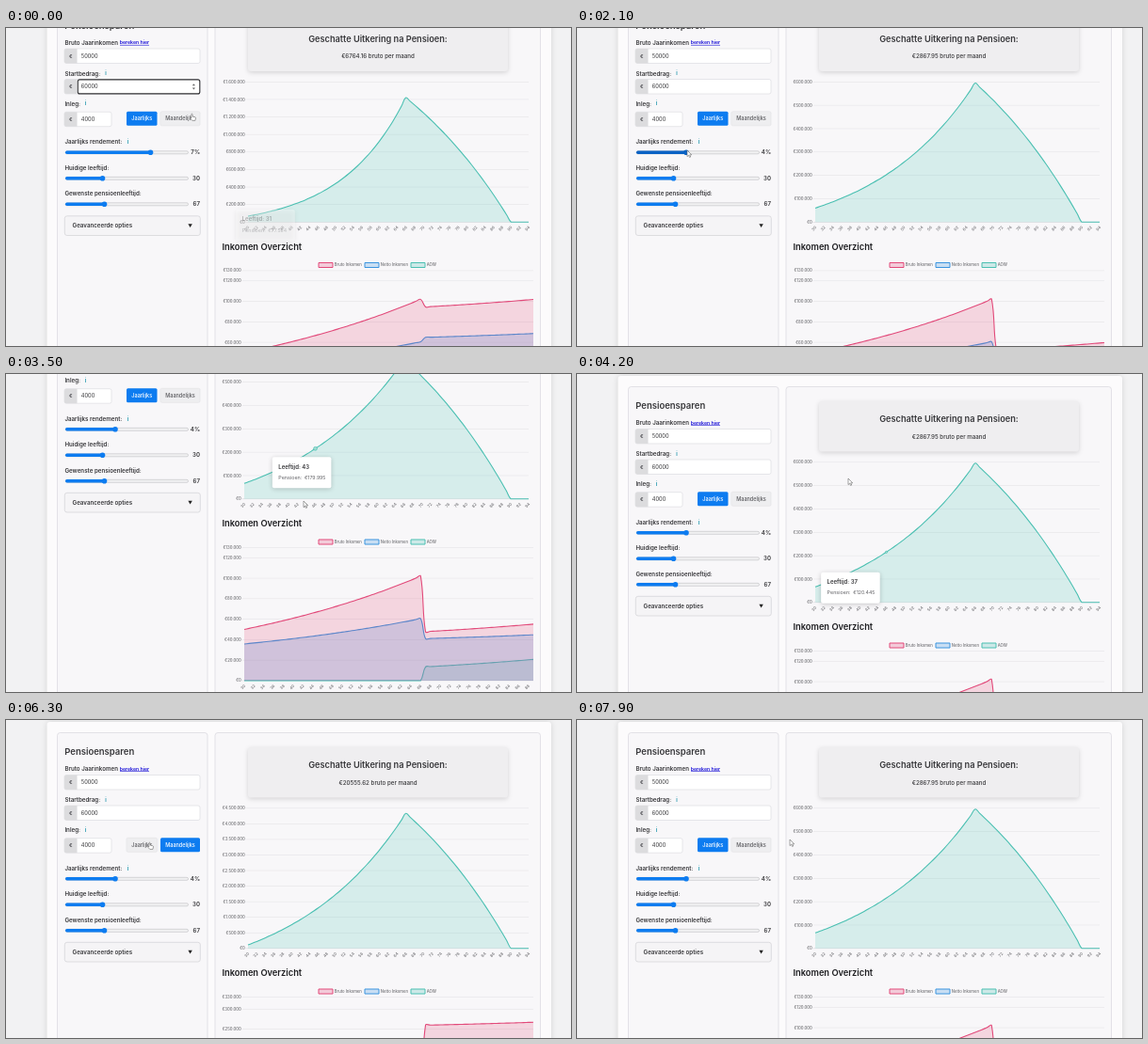
An HTML page with a canvas that plays this animation: 600 px wide and 338 px high, repeating every 8 s.

```html
<!DOCTYPE html>
<html lang="nl">
<head>
<meta charset="utf-8">
<title>Pensioensparen</title>
<style>
html, body { margin: 0; width: 100%; height: 100%; overflow: hidden; background: #f2f2f3; }
canvas { display: block; width: 600px; height: 338px; }
</style>
</head>
<body>
<canvas id="stage"></canvas>
<script>
const W = 600, H = 338, LOOP = 8000;
const canvas = document.getElementById('stage');
const ctx = canvas.getContext('2d');
const ratio = Math.max(1, window.devicePixelRatio || 1);
canvas.width = W * ratio;
canvas.height = H * ratio;

const FONT = 'Inter, "Open Sans", sans-serif';
const BLUE = '#0d7cf0', DARK = '#38383b', GREY = '#707074';
const GREEN = [75, 192, 178], PINK = [226, 74, 122], SKY = [58, 148, 222];
const rgba = (c, a) => `rgba(${c},${a})`;
const lerp = (a, b, p) => a + (b - a) * p;
const clamp = (v, a, b) => Math.min(b, Math.max(a, v));
const smooth = p => p * p * (3 - 2 * p);
const easeOut = p => 1 - Math.pow(1 - clamp(p, 0, 1), 4);
const euro = v => '€' + String(Math.round(v)).replace(/\B(?=(\d{3})+$)/g, '.');

// Each state starts at a time; the charts glide to it in one second
const states = [
  { at: -5000, rate: 7, pay: 6764.16, top: 1.6e6, step: 2e5, left: 257 },
  { at: 1080, rate: 5, pay: 3795.42, top: 8e5, step: 1e5, left: 253 },
  { at: 1900, rate: 4, pay: 2867.95, top: 6e5, step: 1e5, left: 253 },
  { at: 5200, rate: 4, pay: 20555.62, top: 4.5e6, step: 5e5, left: 257, monthly: true },
  { at: 6500, rate: 4, pay: 2867.95, top: 6e5, step: 1e5, left: 253 }
];
const A = { right: 555, top: 93.8, base: 242.8, n: 65 };
const B = { left: 253, right: 560, top: 294.4, base: 435.9, n: 60 };
const WORK = 36;

function capital(s, i) {
  const g = 1 + s.rate / 100, paid = s.monthly ? 48000 : 4000;
  const grown = k => 60000 * g ** k + paid * g * (g ** k - 1) / (g - 1);
  if (i <= WORK) return grown(i + 1);
  const left = Math.max(0, 1 - 1.03 ** (i - WORK - 24));
  return grown(WORK + 1) * left / (1 - 1.03 ** -24);
}

function income(s, i) {
  if (i <= WORK) {
    const gross = 50000 * 1.02 ** i;
    return [gross, 35800 + (gross - 50000) * .475, 0];
  }
  const aow = 13400 * 1.02 ** (i - WORK - 1);
  const gross = s.pay * 12 + aow;
  return [gross, 41000 + (gross - 47800) * .51, aow];
}

function settle(s) {
  const top2 = s.monthly ? 330000 : 130000;
  const lines = [[], [], [], []];
  for (let i = 0; i < A.n; i++) {
    lines[0].push({
      x: lerp(s.left, A.right, i / (A.n - 1)),
      y: lerp(A.base, A.top, capital(s, i) / s.top)
    });
  }
  for (let i = 0; i < B.n; i++) {
    income(s, i).forEach((v, k) => lines[k + 1].push({
      x: lerp(B.left, B.right, i / (B.n - 1)),
      y: lerp(B.base, B.top, v / top2)
    }));
  }
  return lines;
}
states.forEach(s => { s.lines = settle(s); });

function shape(t, k) {
  const s = states[k];
  const p = easeOut((t - s.at) / 1000);
  if (k === 0 || p === 1) return s.lines;
  const from = shape(s.at, k - 1);
  return s.lines.map((line, a) => line.map((q, i) => ({
    x: lerp(from[a][i].x, q.x, p), y: lerp(from[a][i].y, q.y, p)
  })));
}

// Eased path through [time, ...values] stops
function along(stops, t) {
  let i = 0;
  while (i < stops.length - 2 && t >= stops[i + 1][0]) i++;
  const a = stops[i], b = stops[i + 1];
  const p = smooth(clamp((t - a[0]) / (b[0] - a[0]), 0, 1));
  return a.slice(1).map((v, k) => lerp(v, b[k + 1], p));
}
const pointerStops = [
  [0, 197, 91], [100, 197, 91], [650, 154, 130], [900, 153, 130], [1080, 130, 130],
  [1750, 130, 130], [1900, 117, 130], [2100, 117, 130], [2850, 316, 135],
  [3600, 316, 135], [4200, 288, 111], [4400, 288, 111], [4950, 188, 130],
  [5600, 188, 130], [6150, 152, 130], [6750, 152, 130], [7600, 226, 127], [8000, 226, 127]
];
const scrollStops = [[0, 36.5], [3100, 36.5], [3400, 110], [3700, 110], [4100, 0], [8000, 0]];

function text(str, x, y, size, weight = 400, color = DARK, align = 'left') {
  ctx.font = `${weight} ${size}px ${FONT}`;
  ctx.fillStyle = color;
  ctx.textAlign = align;
  ctx.textBaseline = 'alphabetic';
  ctx.fillText(str, x, y + size * .35);
}

function box(x, y, w, h, r, fill, stroke, line = .7) {
  ctx.beginPath();
  ctx.roundRect(x, y, w, h, r);
  if (fill) { ctx.fillStyle = fill; ctx.fill(); }
  if (stroke) { ctx.strokeStyle = stroke; ctx.lineWidth = line; ctx.stroke(); }
}

function shadowBox(x, y, w, h, r, fill, blur, alpha, dy = 1) {
  ctx.save();
  ctx.shadowColor = `rgba(0,0,0,${alpha})`;
  ctx.shadowBlur = blur * ratio;
  ctx.shadowOffsetY = dy * ratio;
  box(x, y, w, h, r, fill);
  ctx.restore();
}

function rule(x1, x2, y, color = '#e4e3e6') {
  ctx.fillStyle = color;
  ctx.fillRect(x1, y - .3, x2 - x1, .6);
}

function label(str, y) {
  text(str, 62.4, y, 6.2, 600);
}

function info(x, y) {
  text('i', x, y, 5.5, 700, '#2a9bb0', 'center');
}

function field(y, w, value) {
  box(62, y, w, 15.5, 2, '#ffffff', '#dddde1');
  box(62, y, 13.5, 15.5, [2, 0, 0, 2], '#dcdcde');
  text('€', 68.7, y + 7.8, 5.2, 600, '#444448', 'center');
  text(value, 79.8, y + 7.8, 5.7);
}

function slider(y, thumb, value, color) {
  box(63.2, y - 1.5, 130.3, 3, 1.5, '#f1f1f2', '#bdbdc0', .6);
  box(63, y - 1.7, thumb - 63, 3.4, 1.7, color);
  ctx.beginPath();
  ctx.arc(thumb, y, 2.8, 0, 7);
  ctx.fillStyle = color;
  ctx.fill();
  text(value, 206, y, 6.1, 600, DARK, 'right');
}

function form(t, s) {
  text('Pensioensparen', 62.2, 34, 9.5, 600);
  label('Bruto Jaarinkomen', 52);
  text('bereken hier', 120.8, 52, 5.2, 600, '#1a12d8');
  rule(121, 152, 54.7, '#1a12d8');
  field(58.5, 144, '50000');
  label('Startbedrag:', 85);
  info(106, 85);
  field(91, 144, '60000');
  if (t < 850) {
    box(76.3, 91.4, 129.5, 15, 2, null, '#333336', 1.1);
    ctx.fillStyle = '#666';
    ctx.beginPath();
    ctx.moveTo(197.8, 97.7); ctx.lineTo(199.4, 95.7); ctx.lineTo(201, 97.7);
    ctx.moveTo(197.8, 99.9); ctx.lineTo(199.4, 101.9); ctx.lineTo(201, 99.9);
    ctx.fill();
  }
  label('Inleg:', 117);
  info(84.5, 117);
  field(125.7, 50, '4000');
  [['Jaarlijks', 128, 32.5, !s.monthly], ['Maandelijks', 164, 42, s.monthly]].forEach(([name, x, w, on]) => {
    box(x, 125.3, w, 15, 1.5, on ? BLUE : '#eeeef0', on ? null : '#e4e4e7');
    text(name, x + w / 2, 132.8, 5.5, 500, on ? '#fff' : '#5a5a5e', 'center');
  });
  label('Jaarlijks rendement:', 157.7);
  info(129.5, 157.7);
  slider(168.8, 66 + s.rate * 12.5, s.rate + '%', t > 600 && t < 2200 ? '#0a62c4' : BLUE);
  label('Huidige leeftijd:', 185);
  slider(196.3, 102.5, '30', BLUE);
  label('Gewenste pensioenleeftijd:', 212.5);
  slider(223.8, 104.5, '67', BLUE);
  box(62.3, 236.3, 144, 20.7, 2.5, '#f5f4f6', '#d2d1d6');
  text('Geavanceerde opties', 70.5, 246.6, 6.2, 600);
  ctx.fillStyle = '#222';
  ctx.beginPath();
  ctx.moveTo(193.4, 244.7); ctx.lineTo(197.8, 244.7); ctx.lineTo(195.6, 248.6);
  ctx.fill();
}

// Smoothed line with the usual 0.4 tension
function curve(pts, base, color, alpha) {
  const n = pts.length, tension = .4;
  const ctl = pts.map((q, i) => {
    const a = pts[Math.max(0, i - 1)], b = pts[Math.min(n - 1, i + 1)];
    const d1 = Math.hypot(q.x - a.x, q.y - a.y), d2 = Math.hypot(b.x - q.x, b.y - q.y);
    const f1 = tension * d1 / (d1 + d2 || 1), f2 = tension * d2 / (d1 + d2 || 1);
    const dx = b.x - a.x, dy = b.y - a.y;
    return [q.x - f1 * dx, Math.min(base, q.y - f1 * dy), q.x + f2 * dx, Math.min(base, q.y + f2 * dy)];
  });
  const path = new Path2D();
  path.moveTo(pts[0].x, pts[0].y);
  for (let i = 1; i < n; i++) {
    path.bezierCurveTo(ctl[i - 1][2], ctl[i - 1][3], ctl[i][0], ctl[i][1], pts[i].x, pts[i].y);
  }
  const area = new Path2D(path);
  area.lineTo(pts[n - 1].x, base);
  area.lineTo(pts[0].x, base);
  ctx.fillStyle = rgba(color, alpha);
  ctx.fill(area);
  ctx.strokeStyle = rgba(color, 1);
  ctx.lineWidth = 1.1;
  ctx.lineJoin = 'round';
  ctx.stroke(path);
}

function axes(chart, left, ticks, top) {
  ticks.forEach(v => {
    const y = lerp(chart.base, chart.top, v / top);
    rule(left - 2.5, chart.right, y, v ? '#e5e4e7' : '#d8d7db');
    text(euro(v), left - 3.2, y + .1, 4.25, 500, GREY, 'right');
  });
  for (let i = 0; i < chart.n; i += 2) {
    const x = lerp(left, chart.right, i / (chart.n - 1));
    ctx.save();
    ctx.translate(x + .5, chart.base + 4.8);
    ctx.rotate(-.82);
    text(String(30 + i), 0, 0, 4.2, 500, GREY, 'right');
    ctx.restore();
  }
}

function range(top, step) {
  const out = [];
  for (let v = 0; v < top; v += step) out.push(v);
  return out.concat(top);
}

function charts(t, s, lines) {
  shadowBox(257, 29, 276, 53.5, 3, '#efeef0', 5, .15, 1.5);
  text('Geschatte Uitkering na Pensioen:', 395, 48, 9.2, 600, DARK, 'center');
  text(`€${s.pay.toFixed(2)} bruto per maand`, 395, 66.5, 6.2, 500, DARK, 'center');
  axes(A, s.left, range(s.top, s.step), s.top);
  curve(lines[0], A.base, GREEN, .2);
  if (t > 3050 && t < 4500) {
    const q = lines[0][16];
    ctx.beginPath();
    ctx.arc(q.x, q.y, t < 3900 ? 1.9 : 1.1, 0, 7);
    ctx.fillStyle = '#a5ddd4';
    ctx.fill();
    ctx.strokeStyle = rgba(GREEN, 1);
    ctx.lineWidth = .7;
    ctx.stroke();
  }
  text('Inkomen Overzicht', 229.5, 269, 9.3, 600, '#1d1d20');
  [['Bruto Inkomen', PINK, 332], ['Netto Inkomen', SKY, 381], ['AOW', GREEN, 430]].forEach(([name, c, x]) => {
    box(x, 286, 15, 5, 0, rgba(c, .25), rgba(c, 1), 1);
    text(name, x + 16.8, 288.5, 4.2, 500, GREY);
  });
  axes(B, B.left, s.monthly ? range(330000, 50000) : range(130000, 20000), s.monthly ? 330000 : 130000);
  curve(lines[3], B.base, GREEN, .2);
  curve(lines[2], B.base, SKY, .24);
  curve(lines[1], B.base, PINK, .2);
}

function tooltip(age, value, x, y, alpha) {
  ctx.save();
  ctx.globalAlpha = alpha;
  shadowBox(x - 31.3, y, 62.6, 33, 2, '#ffffff', 5, .2);
  text(`Leeftijd: ${age}`, x - 24.8, y + 10.3, 6, 600);
  text('Pensioen:', x - 24.8, y + 21.7, 5.4, 400, '#606064');
  text(euro(value), x + 2.8, y + 21.7, 5.2, 400, '#606064');
  ctx.restore();
}

function hover(t, s, line) {
  if (t < 300) {
    tooltip(31, capital(s, 1), 275.5, 229.5, .36 * (1 - t / 300));
    return;
  }
  const fade = clamp((t - 2430) / 150, 0, 1) * clamp((4800 - t) / 200, 0, 1);
  if (!fade) return;
  const index = time => clamp((along(pointerStops, time)[0] - 253) / 4.72, 0, 64);
  const i = Math.floor(index(t));
  const late = Math.max(0, index(t - 150) - .4);
  const k = Math.floor(late), p = late - k;
  const x = lerp(line[k].x, line[k + 1].x, p), y = lerp(line[k].y, line[k + 1].y, p);
  tooltip(30 + i, capital(s, i), x, y, fade);
}

const ARROW = new Path2D('M0 0V6.6L1.6 5.2 2.6 7.5 3.7 7 2.7 4.8H4.7Z');
const HAND = new Path2D('M1.4 .5C2 0 2.6 .3 2.6 1V3.1L5.3 3.7Q6.1 4 6 4.8L5.4 7.4H2.3L.1 5Q-.3 4.3 .5 4.2L1.4 4.7Z');

function pointer(x, y, scroll) {
  const py = y + scroll;
  const hand = x > 127 && x < 207 && py > 124 && py < 141;
  ctx.save();
  ctx.translate(x - (hand ? 1.5 : 0), y);
  ctx.fillStyle = '#fff';
  ctx.strokeStyle = '#666';
  ctx.lineWidth = .6;
  ctx.fill(hand ? HAND : ARROW);
  ctx.stroke(hand ? HAND : ARROW);
  ctx.restore();
}

function draw(t) {
  let k = states.length - 1;
  while (t < states[k].at) k--;
  const s = states[k], lines = shape(t, k);
  const [scroll] = along(scrollStops, t);
  const [px, py] = along(pointerStops, t);
  ctx.setTransform(ratio, 0, 0, ratio, 0, 0);
  ctx.fillStyle = '#f2f2f3';
  ctx.fillRect(0, 0, W, H);
  ctx.save();
  ctx.translate(0, -scroll);
  shadowBox(43.5, 2, 535.5, 520, 3, '#fcfbfc', 6, .13, 0);
  box(54.5, 13.5, 159.5, 480, 3, '#f8f7f9', '#d8d7de');
  box(222, 13.5, 345.5, 480, 3, '#f8f7f9', '#d8d7de');
  form(t, s);
  charts(t, s, lines);
  hover(t, s, lines[0]);
  ctx.restore();
  pointer(px, py, scroll);
}

const start = performance.now();
function tick() {
  draw((performance.now() - start) % LOOP);
  requestAnimationFrame(tick);
}
tick();
</script>
</body>
</html>
```
